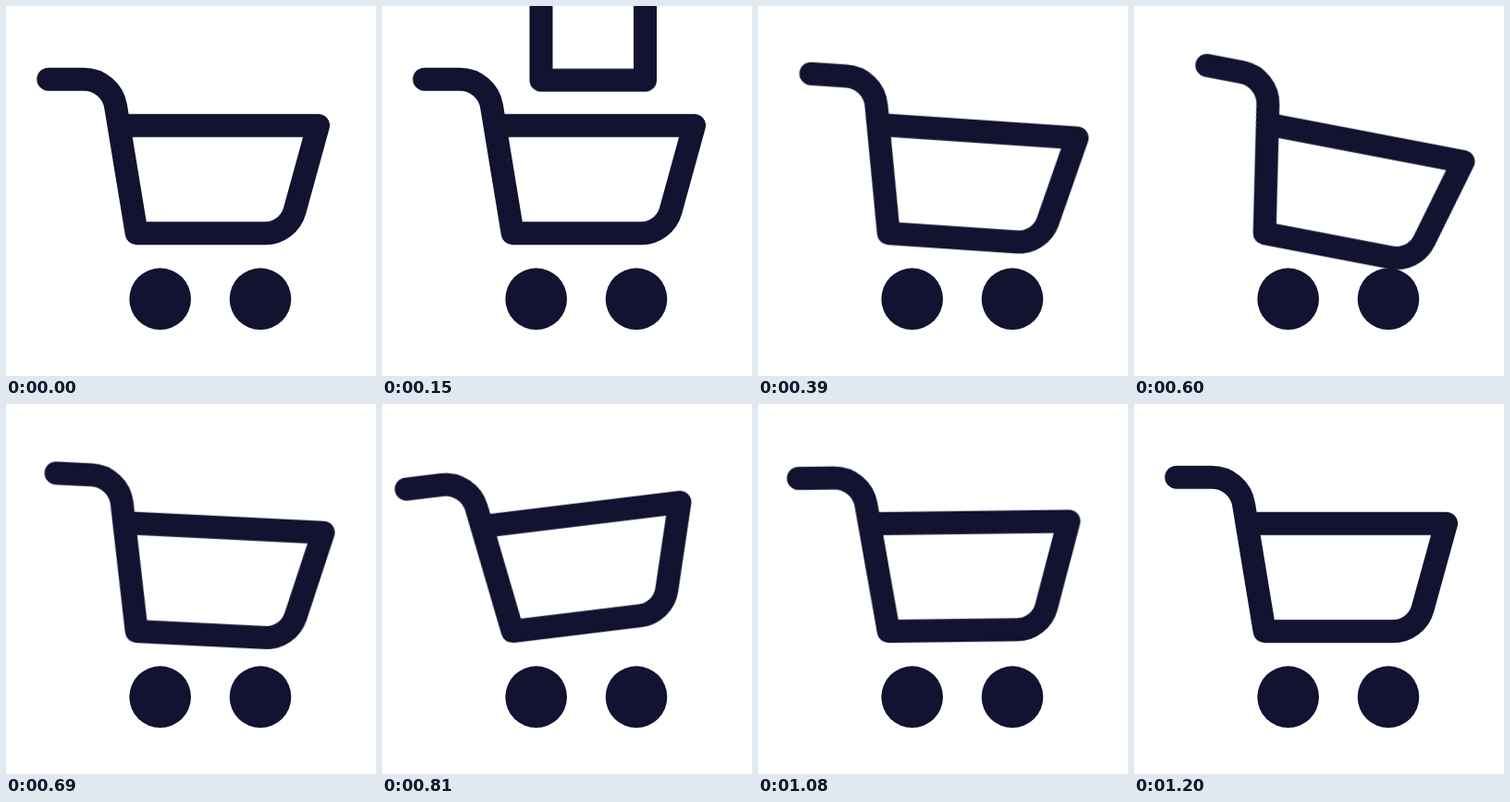
Animation, 400 px wide and 400 px high, one loop 3230 ms. Source, as an HTML page:

```html
<!DOCTYPE html>
<html lang="en">
<head>
<meta charset="utf-8">
<title>Shopping cart</title>
<style>
  html, body { margin: 0; width: 100%; height: 100%; overflow: hidden; background: #fff; }
  svg { display: block; width: 100%; height: 100%; }

  .line { fill: none; stroke: #121331; stroke-width: 25; stroke-linecap: round; stroke-linejoin: round; }
  .wheel { fill: #121331; }

  .cart { transform-origin: 141.2px 245.83px; animation: tilt 3230ms infinite; }
  .box { animation: drop 3230ms infinite; }

  /* the cart tips forward under the load, rocks back and settles */
  @keyframes tilt {
    0%, 7.74% { transform: rotate(0deg); animation-timing-function: cubic-bezier(.333, 0, .667, 1); }
    18.58% { transform: rotate(10.85deg); animation-timing-function: cubic-bezier(.333, 0, .667, 1); }
    24.61% { transform: rotate(-7deg); animation-timing-function: cubic-bezier(.33, 0, .42, 1); }
    37.15%, 100% { transform: rotate(0deg); }
  }

  @keyframes drop {
    0% { transform: translateY(-130px); animation-timing-function: cubic-bezier(.333, 0, .667, 1); }
    11.61%, 100% { transform: translateY(146px); }
  }
</style>
</head>
<body>
<svg viewBox="0 0 400 400">
  <defs>
    <clipPath id="above"><rect x="-100" y="-300" width="600" height="429"/></clipPath>
  </defs>
  <circle class="wheel" cx="166.67" cy="316.67" r="33.33"/>
  <circle class="wheel" cx="275" cy="316.67" r="33.33"/>
  <g class="cart">
    <g clip-path="url(#above)">
      <rect class="line box" x="172" y="0" width="112.5" height="112"/>
    </g>
    <path class="line" d="M45.83 79.17H84A35 35 0 0 1 118.6 108.5L122 129.17H337.5L312.1 221.4A33.3 33.3 0 0 1 280 245.83H141.2L122 129.17"/>
  </g>
</svg>
</body>
</html>
```
